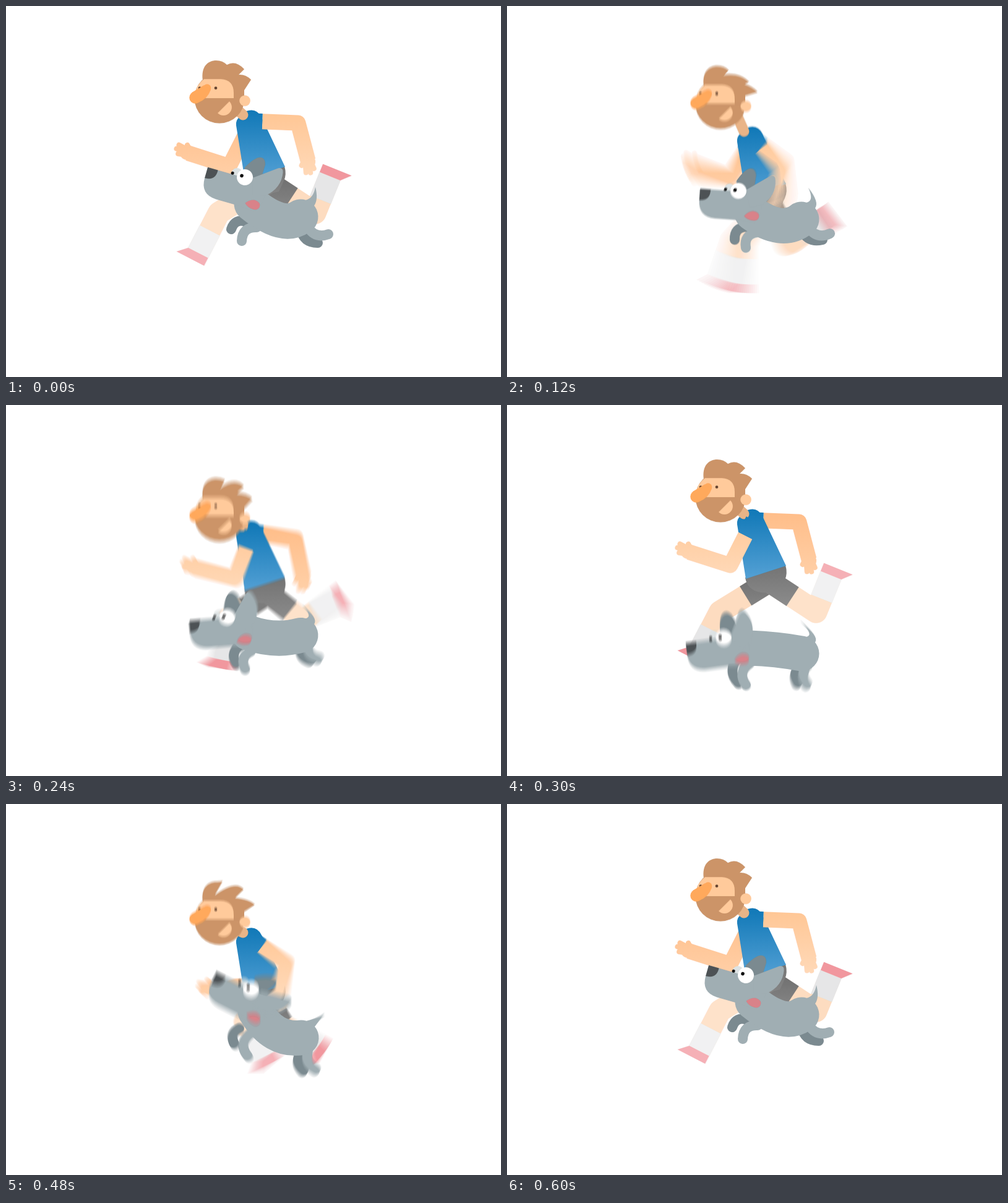
Recreate the animation shown at these times as an HTML page with a canvas. Size 800 by 600 pixels, loop 630 ms.

```html
<!DOCTYPE html>
<html lang="en">
<head>
<meta charset="utf-8">
<title>Morning run</title>
<style>
  html, body { margin: 0; width: 100%; height: 100%; overflow: hidden; background: #fff; }
  canvas { display: block; width: 800px; height: 600px; }
</style>
</head>
<body>
<canvas id="stage" width="800" height="600"></canvas>
<script>
const out = document.getElementById('stage').getContext('2d');
const buffer = document.createElement('canvas');
buffer.width = 800;
buffer.height = 600;
const c = buffer.getContext('2d');

const STEP = 30, STEPS = 21, CYCLE = 600;
const SHUTTER = 16, SAMPLES = 16;
const RAD = Math.PI / 180;

// Periodic cubic track; rows are [time, ...values], at rest every `rest` ms.
function track(period, rest, rows) {
  const n = rows.length;
  const row = i => {
    const w = Math.floor(i / n), r = rows[i - w * n];
    return [r[0] + w * period, ...r.slice(1)];
  };
  const slope = (i, k) => {
    const a = row(i - 1), b = row(i), d = row(i + 1);
    const s1 = (b[k] - a[k]) / (b[0] - a[0]), s2 = (d[k] - b[k]) / (d[0] - b[0]);
    if (b[0] % rest === 0 || s1 * s2 <= 0) return 0;
    const m = (d[k] - a[k]) / (d[0] - a[0]);
    return Math.sign(m) * Math.min(Math.abs(m), 3 * Math.abs(s1), 3 * Math.abs(s2));
  };
  return t => {
    t = ((t % period) + period) % period;
    let i = n - 1;
    while (rows[i][0] > t) i--;
    const a = row(i), b = row(i + 1), h = b[0] - a[0], u = (t - a[0]) / h;
    const u2 = u * u, u3 = u2 * u;
    return a.slice(1).map((v, j) =>
      v * (2 * u3 - 3 * u2 + 1) + b[j + 1] * (3 * u2 - 2 * u3) +
      h * (slope(i, j + 1) * (u3 - 2 * u2 + u) + slope(i + 1, j + 1) * (u3 - u2)));
  };
}

// Runner: torso drop, head drop
const bob = track(300, 300, [
  [0, 0, 0], [90, 16, 3], [120, 27, 9], [180, 32, 38], [210, 30, 42]
]);
// Hair: tip and notch of each tuft
const hair = track(300, 300, [
  [0, 357, 95, 357, 95, 385, 102, 376, 111, 396, 119],
  [90, 360, 98, 359, 100, 392, 115, 384, 118, 405, 129],
  [120, 358, 95, 351, 102, 391, 114, 384, 117, 405, 130],
  [180, 350, 87, 337, 110, 384, 100, 370, 114, 402, 125]
]);
// Limbs: upper angle, upper length, lower angle, lower length
const legTrack = track(600, 300, [
  [0, 148.3, 94, 117.3, 73], [90, 148.7, 113, 135.7, 57], [120, 124, 86, 98, 65],
  [180, 60, 48, 35.6, 65], [300, 33.2, 90.5, -68.2, 64], [390, 46.5, 83, -37.7, 67],
  [420, 64.7, 80, -37, 65], [480, 136.5, 52, 58.3, 65]
]);
const armTrack = track(600, 300, [
  [0, 116.9, 82, 197.7, 70], [90, 130.6, 74, 216.9, 60], [120, 117, 73, 192, 58],
  [180, 36.5, 67, 101, 58], [300, 2.3, 74, 75.3, 63], [390, 3.3, 70, 45, 52],
  [420, 47, 66, 98, 58], [480, 92, 75, 175, 62]
]);

// Dog: head position, head tilt, ear tilt
const dogHead = track(600, 600, [
  [0, 386, 277, 16, 10], [120, 374, 299, 4, 13], [180, 369, 314, 0, 0],
  [300, 350, 376, -8, -15], [345, 358, 408, 0, 25], [390, 372, 388, 9, 48],
  [480, 396, 300, 27, 34], [540, 393, 271, 22, 16]
]);
// Spine: chest, middle, rump
const spine = track(600, 600, [
  [0, 397, 320, 442, 346, 476, 341], [120, 396, 335, 440, 355, 476, 345],
  [180, 392, 346, 436, 362, 476, 350], [300, 392, 393, 435, 396, 476, 402],
  [360, 400, 416, 440, 427, 477, 438], [390, 402, 408, 440, 421, 477, 435],
  [480, 403, 335, 436, 370, 477, 378]
]);
// Paws: hip, foot, offset of the far foot
const frontPaw = track(600, 600, [
  [0, 405, 358, 381, 380, -17, -19], [120, 404, 366, 386, 391, -18, -13],
  [180, 402, 378, 387, 400, -17, -12], [300, 392, 418, 386, 453, -12, -3],
  [390, 402, 438, 426, 467, -20, 10], [480, 394, 372, 391, 408, -22, -20]
]);
const hindPaw = track(600, 600, [
  [0, 488, 358, 521, 369, -17, 14], [120, 488, 360, 522, 368, -12, 10],
  [180, 488, 366, 520, 376, -10, 8], [300, 486, 420, 484, 452, -15, -2],
  [360, 480, 460, 476, 492, -14, -5], [390, 478, 458, 472, 485, -13, -8],
  [480, 488, 400, 500, 430, -20, 2]
]);
const tailTip = track(600, 600, [
  [0, 500, 293], [120, 487, 294], [180, 485, 302],
  [300, 474, 350], [390, 508, 398], [480, 515, 340]
]);

function fill(color, d) {
  c.fillStyle = color;
  c.fill(new Path2D(d));
}
function disc(color, x, y, r) {
  c.fillStyle = color;
  c.beginPath();
  c.arc(x, y, r, 0, 7);
  c.fill();
}
function line(color, width, points, cap = 'butt') {
  c.strokeStyle = color;
  c.lineWidth = width;
  c.lineCap = cap;
  c.lineJoin = 'round';
  c.beginPath();
  points.forEach(p => c.lineTo(p[0], p[1]));
  c.stroke();
}
function curve(color, width, x0, y0, cx, cy, x1, y1) {
  c.strokeStyle = color;
  c.lineWidth = width;
  c.lineCap = 'round';
  c.beginPath();
  c.moveTo(x0, y0);
  c.quadraticCurveTo(cx, cy, x1, y1);
  c.stroke();
}
function fade(y0, y1, from, to) {
  const g = c.createLinearGradient(0, y0, 0, y1);
  g.addColorStop(0, from);
  g.addColorStop(1, to);
  return g;
}
function local(x, y, angle, draw) {
  c.save();
  c.translate(x, y);
  c.rotate(angle * RAD);
  draw();
  c.restore();
}
const move = (p, angle, len) =>
  [p[0] + len * Math.cos(angle * RAD), p[1] + len * Math.sin(angle * RAD)];

const NEAR = {
  arm: ['#ffc694', '#ffdaba'], leg: '#fee2ca', sock: '#f1f1f2', shoe: '#f5b0b6',
  shorts: ['#747474', '#8c8c8c']
};
const FAR = {
  arm: ['#ffbd88', '#ffd0a8'], leg: '#fddcc0', sock: '#e6e6e7', shoe: '#f1979e',
  shorts: ['#686868', '#848484']
};

function leg(t, drop, look) {
  const [a1, l1, a2, l2] = legTrack(t);
  const hip = [424, 285 + drop], knee = move(hip, a1, l1), ankle = move(knee, a2, l2);
  line(look.leg, 36, [hip, knee, ankle]);
  line(look.sock, 36.5, [move(ankle, a2, -41), ankle]);
  local(ankle[0], ankle[1], a2, () => fill(look.shoe, 'M0-18V18L14 32V-18Z'));
  line(fade(260 + drop, 325 + drop, ...look.shorts), 36.5, [hip, move(hip, a1, Math.min(45, l1 * .9))]);
}

function arm(t, drop, look, shirt) {
  const [a1, l1, a2, l2] = armTrack(t);
  const top = [398, 186 + drop], elbow = move(top, a1, l1), wrist = move(elbow, a2, l2);
  const cuff = move(top, a1, 16 + Math.max(0, a1) * .104);
  const skin = fade(170 + drop, 280 + drop, ...look.arm);
  line(skin, 25, [cuff, elbow, wrist]);
  for (const [u, v] of [[18, 8], [20, 1], [15, -6], [5, 12]]) {
    const tip = move(move(wrist, a2, u), a2 + 90, v);
    line(skin, 8, [move(wrist, a2 + 90, v * .6), tip], 'round');
  }
  disc(skin, ...move(wrist, a2, 2), 11.5);
  line(shirt, 25.5, [top, cuff]);
}

function head(t, drop) {
  const brown = '#cc9468', skin = '#ffca9b';
  const [ax, ay, bx, by, dx, dy, ex, ey, fx, fy] = hair(t);
  c.save();
  c.translate(0, drop);
  disc(brown, 345, 149, 40.5);
  fill(brown, `M318 120C315 98 326 88 340 88Q${ax - 7} 88 ${ax} ${ay}L${bx} ${by}
    Q${dx - 14} ${dy - 15} ${dx} ${dy}L${ex} ${ey}Q${fx - 9} ${fy - 9} ${fx} ${fy}L385 136V150H330Z`);
  fill(skin, 'M304.5 149A40.5 40.5 0 0 1 320 118H347Q368 119 368 140V149Z');
  fill(skin, 'M361 154A13.4 13.4 0 0 1 342 173Z');
  disc(skin, 386, 153, 8.8);
  disc('#63422f', 313, 132.5, 2.3);
  disc('#63422f', 339, 132.5, 2.3);
  disc('#ffa95c', 306, 148, 9.7);
  disc('#ffa95c', 325, 132.5, 6.2);
  fill('#ffa95c', 'M300 140L320 128L331 135Q325 151 311 156Z');
  c.restore();
}

function runner(t) {
  const [drop, nod] = bob(t);
  const shirt = fade(168 + drop, 282 + drop, '#1078b7', '#55a1d5');
  arm(t, drop, FAR, shirt);
  leg(t + 300, drop, FAR);
  leg(t, drop, NEAR);
  c.save();
  c.translate(0, drop);
  fill(fade(260, 325, ...NEAR.shorts),
    'M385 279L450 259Q454 272 449 283L441 300Q420 306 405 302Q388 297 385 279Z');
  fill(fade(168, 282, '#1078b7', '#55a1d5'),
    'M386 281L372 193Q371 184 378 179L388 170Q405 164 413 180L451 260Z');
  c.restore();
  line('#e9b487', 17, [[370, 164 + nod], [383, 176 + drop]], 'round');
  head(t, nod);
  arm(t + 300, drop, NEAR, shirt);
}

const COAT = '#a0aeb3', SHADE = '#7b8a90';

function paw(color, hx, hy, fx, fy, bend) {
  const cx = (hx + fx) / 2 - (fy - hy) * bend, cy = (hy + fy) / 2 + (fx - hx) * bend;
  curve(color, 16, hx, hy, cx, cy, fx, fy);
}

// The spine bends without blur, so it uses the middle of the exposure.
function dog(t, mid) {
  const [hx, hy, tilt, flap] = dogHead(t);
  const [x0, y0, mx, my, x1, y1] = spine(mid);
  const [tx, ty] = tailTip(t);
  const paws = [[frontPaw(t), .5, -17, -9], [hindPaw(t), .4, -12, 2]];

  local(hx, hy, tilt, () => {
    local(10, -12, flap, () => fill(SHADE, 'M-15 0Q-8-22 0-26Q8-30 13-19L17 6L0 18Z'));
    disc('#dde3e4', -14, -2, 9);
  });
  for (const [[ax, ay, fx, fy, dx, dy], bend, ox, oy] of paws)
    paw(SHADE, ax + ox, ay + oy, fx + dx, fy + dy, bend);
  const bx = x1 + 8, by = y1 - 27, ex = x1 + 22, ey = y1 - 18;
  fill(COAT, `M${bx} ${by}Q${bx + 13} ${by - 3} ${tx} ${ty}Q${ex + 7} ${ey - 10} ${ex} ${ey}L${x1} ${y1}Z`);
  for (const [[ax, ay, fx, fy], bend] of paws) paw(COAT, ax, ay, fx, fy, bend);

  curve(COAT, 57, x0, y0, 2 * mx - (x0 + x1) / 2, 2 * my - (y0 + y1) / 2, x1, y1);

  local(hx, hy, tilt, () => {
    fill(COAT, 'M-62 1H-12L12-4L34 4Q46 30 30 50L2 47H-35Q-62 46-62 19Z');
    local(22, 8, flap, () => fill(COAT, 'M-12-8L19-41Q26-46 29-38Q38-14 20 8L2 18Z'));
    fill('#4d5255', 'M-62 1H-45Q-44 19-62 19Z');
    disc('#fff', 0, 0, 13);
    disc('#111', -5.5, -1, 2.8);
    disc('#111', -21, -1, 2.5);
    fill('#d98289', 'M12 40Q18 32 26 31Q37 32 36 40Q34 47 26 46Q18 46 12 40Z');
  });
}

function render(mid) {
  for (let i = 0; i < SAMPLES; i++) {
    const t = mid + ((i + .5) / SAMPLES - .5) * SHUTTER;
    c.fillStyle = '#fff';
    c.fillRect(0, 0, 800, 600);
    runner(t);
    dog(t, mid);
    out.globalAlpha = 1 / (i + 1);
    out.drawImage(buffer, 0, 0);
  }
}

let shown = -1;
function tick() {
  const step = Math.floor(performance.now() / STEP) % STEPS;
  if (step !== shown) {
    shown = step;
    render(step * STEP % CYCLE);
  }
  requestAnimationFrame(tick);
}
tick();
</script>
</body>
</html>
```
